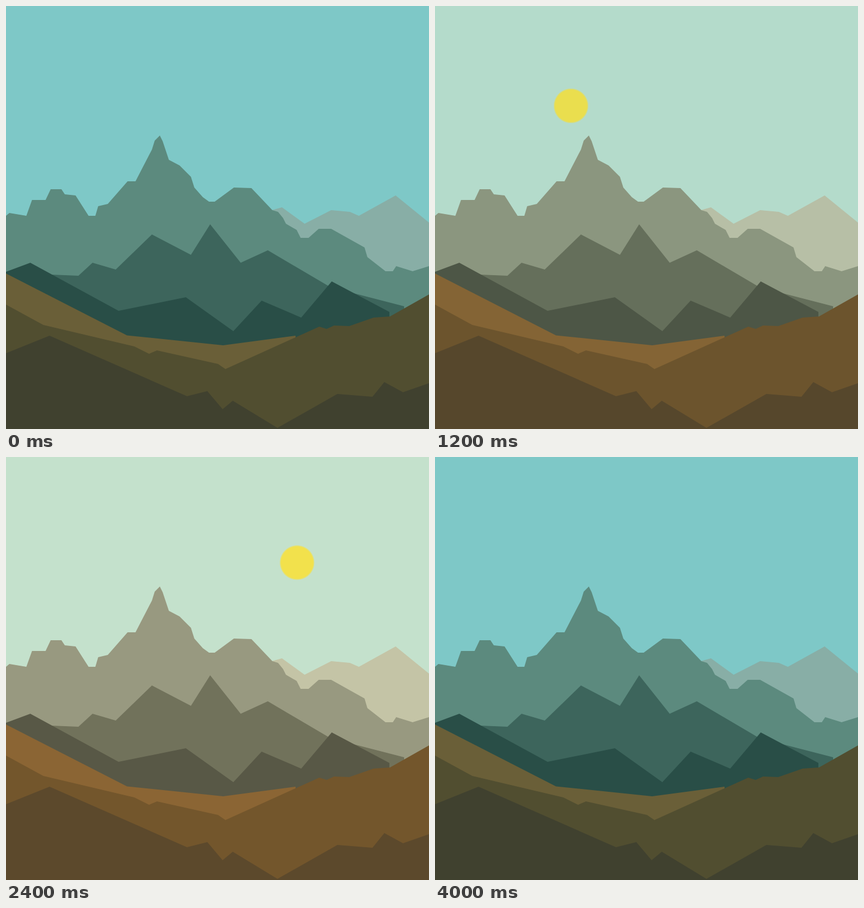
Animation, 748 px wide and 748 px high, one loop 4200 ms. Source, as an HTML page:

```html
<!DOCTYPE html>
<html lang="en">
<head>
<meta charset="utf-8">
<title>Mountain day</title>
<style>
html, body { margin: 0; width: 100%; height: 100%; overflow: hidden; }
svg { display: block; width: 100%; height: 100%; }
</style>
</head>
<body>
<svg id="scene" viewBox="0 0 748 748" xmlns="http://www.w3.org/2000/svg">
  <defs>
    <radialGradient id="disc">
      <stop class="glow" offset="0.91"/>
      <stop class="glow" offset="0.98" stop-opacity="0.4"/>
      <stop class="glow" offset="1" stop-opacity="0"/>
    </radialGradient>
  </defs>
  <rect id="sky" width="748" height="748"/>
  <circle id="sun" r="31" fill="url(#disc)"/>
</svg>
<script>
const SIZE = 748, STEP = 200, STEPS = 21, NOON = 10;

const skyTint = ["#7ec8c7", "#d2e6cd"];
const sunTint = ["#cdd053", "#fae54b"];

// Hills from back to front: tint at dawn and noon, then the ridge;
// each is filled from its ridge down to the bottom of the stage.
const hills = [
  { tint: ["#88aea6", "#d0c8a6"],
    ridge: "M470 361L488 356 528 385 575 361 608 364 624 371 689 335 748 383" },
  { tint: ["#5c8a7e", "#a49c80"],
    ridge: "M0 371L6 366 36 371 46 343H70L79 324H98L104 333 123 335 146 371H158" +
           "L163 354 180 350 215 310H229L258 254 263 238 272 229 277 239 288 272 " +
           "307 282 327 302 333 321 348 338 359 346H369L403 321 434 322 471 361 " +
           "481 364 490 375 495 385 514 396 521 410H535L553 394H575L634 427 639 444 " +
           "671 469H684L690 460 719 469 748 460" },
  { tint: ["#3d655c", "#7b755b"],
    ridge: "M80 475L128 477 153 454 194 466 258 404 327 440 361 386 415 454 463 432 " +
           "570 495 615 508 704 531" },
  { tint: ["#294e47", "#615a46"],
    ridge: "M0 470L43 454 199 539 318 515 402 575 452 521 522 551 576 487 678 541" },
  { tint: ["#6a5f38", "#926633"],
    ridge: "M0 473L214 582.5 384 600 512 583" },
  { tint: ["#514e30", "#7a582b"],
    ridge: "M0 528L66 564 227 602 253 615 267 609 375 633 388 642 514 585 554 567 " +
           "567 571 580 565 607 566 650 551 679 549 748 510" },
  { tint: ["#40412f", "#624b2b"],
    ridge: "M0 614L77 583 320 690 356 681 383 713 401 698 480 746 586 686 648 691 " +
           "669 665 702 683 748 667" }
];

// Turning points of the sun: step, x, y
const arc = [
  [0, 20, 405], [1, 40, 331], [4, 155.5, 237.5], [6, 240.5, 176.5],
  [8, 329, 135], [9, 374, 124], [10, 420.5, 135.5], [11, 470, 155.5],
  [15, 649, 280.5], [18, 735, 338], [20, 760, 470]
];

const scene = document.getElementById("scene");
const sky = document.getElementById("sky");
const sun = document.getElementById("sun");
const glow = document.querySelectorAll(".glow");

for (const hill of hills) {
  hill.shape = document.createElementNS(scene.namespaceURI, "path");
  const left = hill.ridge.match(/\d+/)[0];
  hill.shape.setAttribute("d", `${hill.ridge}V${SIZE}H${left}Z`);
  scene.append(hill.shape);
}

const lerp = (a, b, k) => a + (b - a) * k;
const channels = hex => hex.match(/\w\w/g).map(c => parseInt(c, 16));

function mix([dawn, noon], k) {
  const end = channels(noon);
  return `rgb(${channels(dawn).map((c, i) => Math.round(lerp(c, end[i], k))).join()})`;
}

// Daylight rises to noon and falls again, slightly eased out
function daylight(step) {
  const k = 1 - Math.abs(step - NOON) / NOON;
  return k + 0.2 * k * (1 - k);
}

function sunAt(step) {
  const next = Math.max(1, arc.findIndex(p => p[0] >= step));
  const a = arc[next - 1], b = arc[next];
  const k = (step - a[0]) / (b[0] - a[0]);
  return [lerp(a[1], b[1], k), lerp(a[2], b[2], k)];
}

function draw(time) {
  const step = Math.floor(time / STEP) % STEPS;
  const light = daylight(step);
  const [x, y] = sunAt(step);
  sky.setAttribute("fill", mix(skyTint, light));
  sun.setAttribute("cx", x);
  sun.setAttribute("cy", y);
  for (const stop of glow) stop.setAttribute("stop-color", mix(sunTint, light));
  for (const hill of hills) hill.shape.setAttribute("fill", mix(hill.tint, light));
}

let start;
function tick(now) {
  start ??= now;
  draw(now - start);
  requestAnimationFrame(tick);
}
draw(0);
requestAnimationFrame(tick);
</script>
</body>
</html>
```
